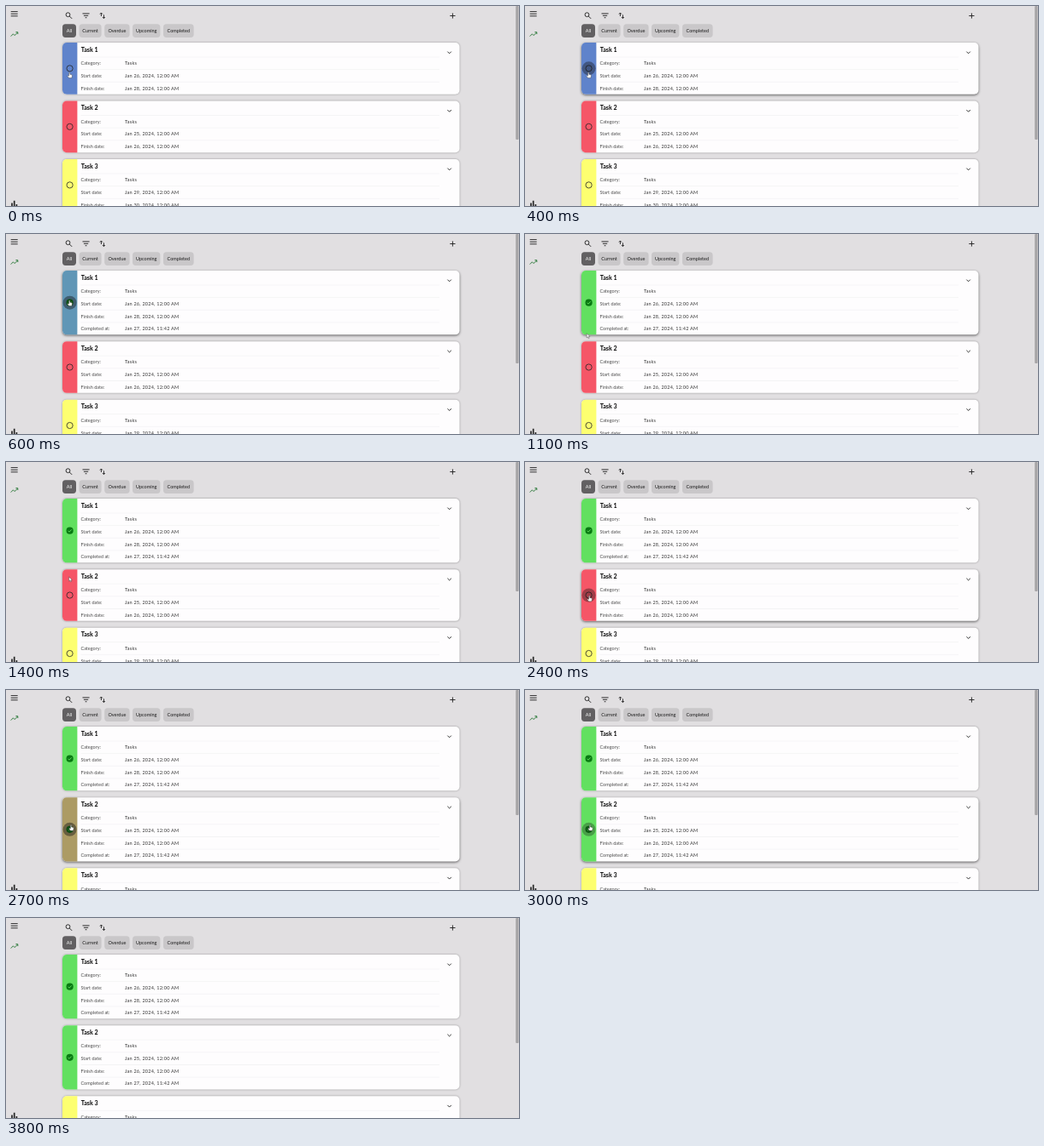
An HTML page that plays this animation: 600 by 235 pixels, repeating every 4300 ms.

```html
<!DOCTYPE html>
<html lang="en">
<head>
<meta charset="utf-8">
<title>Task list</title>
<style>
  html, body { margin: 0; width: 100%; height: 100%; overflow: hidden; background: #e1dfe1; }
  svg { display: block; width: 600px; height: 235px; }
  text { font: 5.5px Lato, "Open Sans", sans-serif; fill: #333; }
  .title { font-size: 7.1px; font-weight: 700; fill: #000; }
  .label { fill: #4c4c4c; }
  .value { letter-spacing: .24px; }
  .chip { text-anchor: middle; fill: #1c1c1c; }
  .line { fill: none; stroke: #262626; stroke-width: .95; }
</style>
</head>
<body>
<svg viewBox="0 0 600 235">
  <g id="chrome"></g>
  <g id="scene"></g>
</svg>
<script>
const LOOP = 4300, STEP = 100;
const ROW = 14.65, CARD = 60.7, GAP = 7.8;
const LEFT = 66, RIGHT = 530.5, BUTTON_X = 74.6;
const GREEN = [98, 224, 96];

const tasks = [
  { name: 'Task 1', color: [95, 131, 203], start: 'Jan 26', finish: 'Jan 28',
    doneAt: 600, fadeFrom: 540,
    hover: [[200, 0], [400, 1], [1100, 1], [1500, 0]],
    press: [[200, 0], [400, .4], [700, .45], [800, .35], [1000, 0]] },
  { name: 'Task 2', color: [245, 86, 103], start: 'Jan 25', finish: 'Jan 26',
    doneAt: 2600, fadeFrom: 2550,
    hover: [[1300, 0], [1600, 1], [3400, 1], [3700, 0]],
    press: [[1400, 0], [1700, .38], [2400, .38], [2600, .48], [2700, .46], [3000, .32], [3200, .32], [3500, 0]] },
  { name: 'Task 3', color: [253, 255, 112], start: 'Jan 29', finish: 'Jan 30',
    doneAt: Infinity, fadeFrom: Infinity, hover: [[0, 0]], press: [[0, 0]] }
];

const cursorX = [[0, 74.2], [800, 74.2], [1100, 72.2], [1700, 75.2], [2400, 75.2], [2600, 76], [3200, 76], [3700, 72]];
const cursorY = [[0, 78], [800, 78], [1100, 116.8], [1200, 120], [1700, 157.2], [2400, 157.2], [2600, 158.6], [3200, 158.6], [3700, 240]];

const clamp = v => Math.max(0, Math.min(1, v));
const mix = (a, b, k) => a + (b - a) * k;

function track(keys, t) {
  const next = keys.findIndex(([time]) => time > t);
  if (next === 0) return keys[0][1];
  if (next < 0) return keys[keys.length - 1][1];
  const [t0, a] = keys[next - 1], [t1, b] = keys[next];
  return mix(a, b, (t - t0) / (t1 - t0));
}

const text = (x, y, cls, s) => `<text x="${x}" y="${y}" class="${cls}">${s}</text>`;
const line = (d, extra = '') => `<path class="line" d="${d}" ${extra}/>`;

function chip(x, end, label, active) {
  return `<rect x="${x}" y="21.3" width="${end - x}" height="15.6" rx="3.6" fill="${active ? '#626062' : '#c9c7c9'}"/>` +
    `<text x="${(x + end) / 2}" y="31.1" class="chip" ${active ? 'style="fill:#fff"' : ''}>${label}</text>`;
}

function drawChrome() {
  return line('M5.7 6.6H13.7M5.7 9.2H13.7M5.7 11.8H13.7') +
    line('M5.7 35.6L8.4 32.8L10.2 34.6L13.6 31M11.4 30.7H13.8V33.1', 'style="stroke:#2c7a39"') +
    line('M7 235V231.6M9.7 235V228.8M12.4 235V233', 'style="stroke-width:1.7"') +
    '<circle class="line" cx="72.5" cy="10.2" r="2.4"/>' + line('M74.3 12L77.2 14.9') +
    line('M89.5 8.9H97.6M90.9 11.3H96.2M92.6 13.7H94.5') +
    line('M111.4 12V8M109.9 9.5L111.4 8L112.9 9.5M114.4 10.4V14.5M112.9 13L114.4 14.5L115.9 13') +
    line('M522.4 8.4V14.6M519.3 11.5H525.5') +
    chip(66, 82, 'All', true) + chip(85.6, 111.6, 'Current') + chip(115.2, 144.6, 'Overdue') +
    chip(148, 180.4, 'Upcoming') + chip(184, 219.6, 'Completed');
}

function drawButton(cy, done, press) {
  const icon = done
    ? `<circle cx="${BUTTON_X}" cy="${cy}" r="4.1" fill="#087a12"/>` +
      line(`M${BUTTON_X - 2} ${cy + .1}l1.4 1.4l2.7-2.8`, 'style="stroke:#62e060;stroke-width:.9"')
    : `<circle class="line" cx="${BUTTON_X}" cy="${cy}" r="3.6" style="stroke-opacity:.85"/>`;
  return icon + `<circle cx="${BUTTON_X}" cy="${cy}" r="8" fill="#151515" opacity="${press}"/>`;
}

function drawCard(task, y, t) {
  const done = t >= task.doneAt;
  const height = CARD + (done ? ROW : 0);
  const fade = clamp((t - task.fadeFrom) / 300);
  const color = task.color.map((c, i) => Math.round(mix(c, GREEN[i], fade)));
  const hover = track(task.hover, t);
  const shadow = `drop-shadow(0 ${mix(.8, 1.3, hover)}px ${mix(1, 1.4, hover)}px rgba(0,0,0,${mix(.34, .6, hover)}))`;
  const rows = [
    ['Category:', 'Tasks'],
    ['Start date:', `${task.start}, 2024, 12:00 AM`],
    ['Finish date:', `${task.finish}, 2024, 12:00 AM`]
  ];
  if (done) rows.push(['Completed at:', 'Jan 27, 2024, 11:42 AM']);

  const body = rows.map(([label, value], i) => {
    const top = y + 17 + i * ROW;
    return `<path d="M87.5 ${top}H507" stroke="#efeff0" stroke-width=".6"/>` +
      text(87.5, top + 9.2, 'label', label) + text(139, top + 9.2, 'value', value);
  }).join('');

  return `<rect x="${LEFT}" y="${y}" width="${RIGHT - LEFT}" height="${height}" rx="5" fill="#fefdfe" style="filter:${shadow}"/>` +
    `<path d="M83.4 ${y}H71a5 5 0 0 0-5 5V${y + height - 5}a5 5 0 0 0 5 5H83.4Z" fill="rgb(${color})"/>` +
    text(87.7, y + 10.7, 'title', task.name) + body +
    line(`M516.4 ${y + 10.6}l2.2 2.2l2.2-2.2`) +
    drawButton(y + height / 2, done, track(task.press, t));
}

function drawCursor(t) {
  const overButton = t <= 800 || (t >= 1600 && t <= 3200);
  const shape = overButton
    ? 'M-.6 .3Q0-.5.6.3V2.3L2.6 2.8Q3.3 3 3.2 3.8L2.7 6.6H-.6L-2.4 4.2Q-2 3.3-.6 4.2Z'
    : 'M0 0V5.2L1.2 4.1L2.1 6L2.9 5.6L2.1 3.8H3.7Z';
  return `<path transform="translate(${track(cursorX, t)} ${track(cursorY, t)})" d="${shape}" fill="#fff" stroke="#333" stroke-width=".4"/>`;
}

function drawScene(t) {
  let y = 43, cards = '', scrollEnd = 157;
  for (const task of tasks) {
    cards += drawCard(task, y, t);
    const grown = t >= task.doneAt;
    y += CARD + GAP + (grown ? ROW : 0);
    if (grown) scrollEnd -= 5;
  }
  return cards + `<rect x="596.2" y="0" width="3.4" height="${scrollEnd}" rx="1" fill="#a7a5a7"/>` + drawCursor(t);
}

const scene = document.getElementById('scene');
document.getElementById('chrome').innerHTML = drawChrome();
const origin = performance.now();
let shown = -1;

function update(now) {
  const t = Math.floor((Math.max(0, now - origin) % LOOP) / STEP) * STEP;
  if (t !== shown) scene.innerHTML = drawScene(shown = t);
  requestAnimationFrame(update);
}
update(origin);
</script>
</body>
</html>
```
